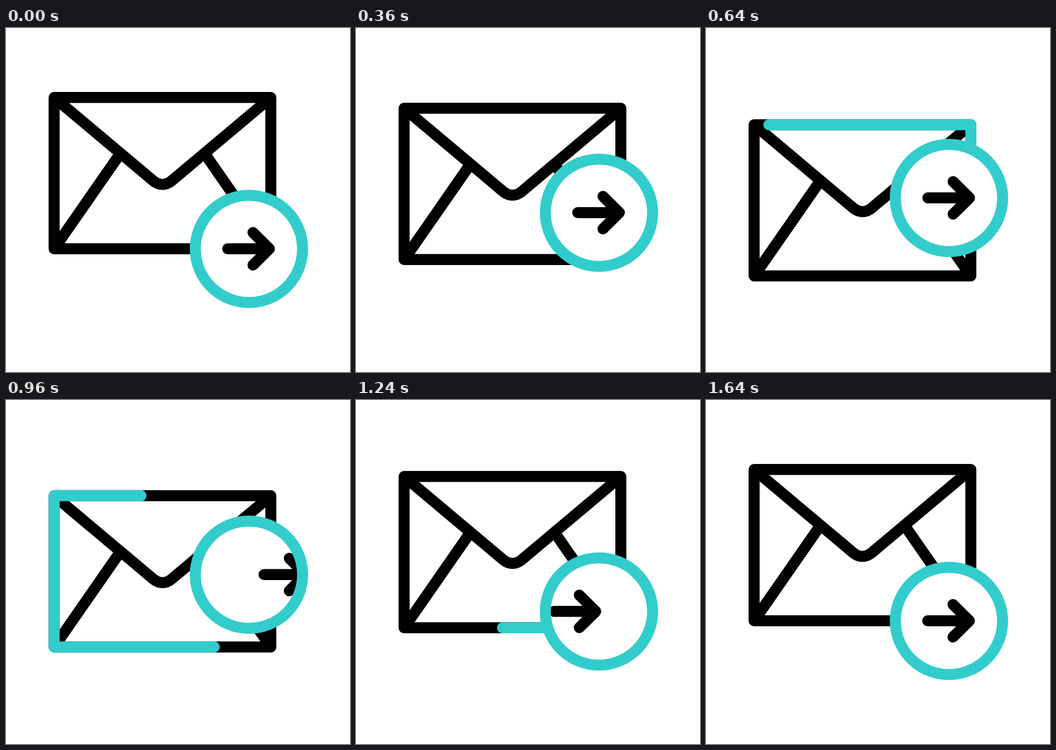
Write an HTML page that moves like this. It is 640x640 px and loops after 2 s.

```html
<!DOCTYPE html>
<html lang="en">
<head>
<meta charset="utf-8">
<title>Send mail</title>
<style>
  html, body { margin: 0; height: 100%; overflow: hidden; background: #fff; }
  svg { display: block; width: 100vw; height: 100vh; }
  path, circle { fill: none; stroke: #000; stroke-width: 20.5; stroke-linejoin: round; }
  .round { stroke-linecap: round; }
  .accent { stroke: #3cc; }
</style>
</head>
<body>
<svg viewBox="0 0 640 640">
  <defs>
    <clipPath id="inside"><circle cx="452" cy="411" r="96"/></clipPath>
    <path id="arrow" class="round" d="M412.5 410.8H490M459.5 380.5L490 410.8L459.5 441"/>
  </defs>
  <g id="envelope">
    <path d="M89.5 129.3H492.7V410.7H89.5Z"/>
    <path d="M89.5 129.3L274 284.3C285 293.3 297.2 293.3 308.2 284.3L492.7 129.3"/>
    <path d="M89.5 410.7L213 233M492.7 410.7L369.2 233"/>
    <path id="trace" class="round accent" pathLength="1" d="M492.7 345V129.3H89.5V410.7H400"/>
  </g>
  <g id="badge">
    <circle cx="452" cy="411" r="99.8" style="fill:#fff;stroke:none"/>
    <g clip-path="url(#inside)">
      <use id="leaving" href="#arrow"/>
      <use id="entering" href="#arrow"/>
    </g>
    <circle class="accent" cx="452" cy="411" r="99.8"/>
  </g>
</svg>
<script>
const LOOP = 2000, STEP = 40;
const $ = id => document.getElementById(id);

// Cubic easing with flat ends: handles at (a, 0) and (b, 1)
function ease(x, a, b) {
  if (x <= 0) return 0;
  if (x >= 1) return 1;
  let lo = 0, hi = 1, s;
  for (let i = 0; i < 24; i++) {
    s = (lo + hi) / 2;
    const px = 3 * a * s * (1 - s) ** 2 + 3 * b * s * s * (1 - s) + s ** 3;
    if (px < x) lo = s; else hi = s;
  }
  return s * s * (3 - 2 * s);
}

const tween = (t, from, to, a = 1 / 3, b = 2 / 3) => ease((t - from) / (to - from), a, b);
const move = (id, x, y) => $(id).setAttribute('transform', `translate(${x} ${y})`);

function draw(t) {
  move('envelope', 0, 51 * (tween(t, 80, 708, .74, .18) - tween(t, 766, 1640, .74, .18)));
  move('badge', 0, -94.7 * (tween(t, 80, 610, .74, .18) - tween(t, 640, 1640, .8, .2)));
  move('leaving', 160 * tween(t, 600, 1395, .74, .18), 0);
  move('entering', 160 * (tween(t, 840, 1640, .5, .23) - 1), 0);

  const head = tween(t, 288, 1003), tail = tween(t, 653, 1388);
  const trace = $('trace').style;
  trace.visibility = head > tail ? 'visible' : 'hidden';
  trace.strokeDasharray = `${head - tail} 2`;
  trace.strokeDashoffset = -tail;
}

function frame() {
  const t = performance.now() % LOOP;
  draw(Math.floor(t / STEP) * STEP);
  requestAnimationFrame(frame);
}
frame();
</script>
</body>
</html>
```
